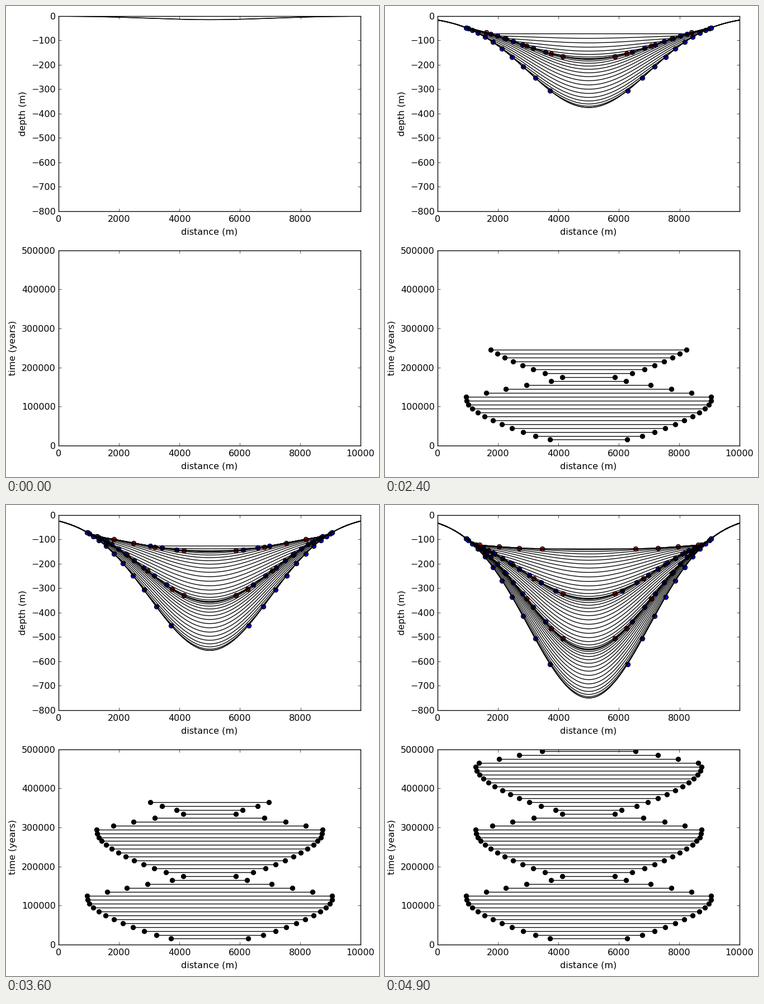
A matplotlib script for the animation above (5000 ms loop, 667 by 840 pixels).

```python
import matplotlib.pyplot as plt
import numpy as np
from matplotlib.animation import FuncAnimation

W, H, DPI = 667, 840, 100
PX = 72 / DPI  # points per pixel
STEPS, STEP_MS, STEP_YEARS = 50, 100, 10000
SUBSIDENCE = 15  # metres per step at the basin centre
CENTRE, SIGMA, DX = 5000, 2000, 10
MEAN_SUPPLY = 2.5 * CENTRE**2 / 2  # sediment volume per radian and step
CYCLES = 3

plt.rcParams.update({
    "font.family": "DejaVu Sans",
    "font.size": 16 * PX,
    "axes.linewidth": 1.33 * PX,
    "lines.linewidth": 1.33 * PX,
    "lines.markersize": 8 * PX,
    "lines.markeredgewidth": 1.33 * PX,
})

x = np.arange(0, 10000, DX)
radius = np.abs(x - CENTRE)


def sag(pos):
    return SUBSIDENCE * np.exp(-((pos - CENTRE) / SIGMA) ** 2 / 2)


def fill_level(surface, volume):
    """Level to which a round basin fills when given this volume."""
    low, high = surface.min(), 0.0
    for _ in range(50):
        mid = (low + high) / 2
        filled = np.sum(np.maximum(mid - surface, 0) * radius) * DX / 2
        low, high = (mid, high) if filled < volume else (low, mid)
    return (low + high) / 2


def build_basin():
    """Surfaces, fill levels and left pinch-outs at the time of deposition."""
    surfaces, levels, edges = [np.zeros(len(x))], [], []
    left = x <= CENTRE
    for step in range(STEPS):
        surface = surfaces[-1] - sag(x)
        supply = MEAN_SUPPLY * (1 - np.cos(2 * np.pi * CYCLES * step / STEPS))
        level = fill_level(surface, supply)
        edges.append(np.interp(-level, -surface[left], x[left]))
        levels.append(level)
        surfaces.append(np.maximum(surface, level))
    return surfaces, levels, edges


surfaces, levels, edges = build_basin()

fig = plt.figure(figsize=(W / DPI, H / DPI), dpi=DPI, facecolor="white")


def add_axes(top, xmax, ylim, yticks, xlabel_y, ylabel, ylabel_x):
    left, width, height = 94.1, 540, 348
    ax = fig.add_axes([left / W, 1 - (top + height) / H, width / W, height / H])
    ax.set(xlim=(0, xmax), ylim=ylim, yticks=yticks,
           xticks=np.arange(0, xmax + 1, 2000))
    ax.ticklabel_format(style="plain", useOffset=False)
    ax.tick_params(direction="in", top=True, right=True,
                   length=5.33 * PX, width=0.67 * PX, pad=5.33 * PX)
    ax.tick_params(axis="x", pad=7 * PX)
    fig.text((left + width / 2) / W, 1 - xlabel_y / H, "distance (m)",
             ha="center", va="center")
    fig.text(ylabel_x / W, 1 - (top + height / 2) / H, ylabel,
             rotation=90, ha="center", va="center")
    return ax


section = add_axes(17.9, x[-1], (-800, 0), np.arange(-800, 1, 100),
                   403, "depth (m)", 31)
chart = add_axes(435.9, 10000, (0, 500000), np.arange(0, 500001, 100000),
                 821, "time (years)", 13)

horizons, pinchouts, spans = [], {}, {}
for step in range(-1, STEPS):
    horizons.append(section.plot([], [], "k-")[0])
    if step < 1:
        continue
    ends = np.array([edges[step], 2 * CENTRE - edges[step]])
    retreating = step > 1 and edges[step] > edges[step - 1] + 20
    # Pinch-out dots lie beneath all horizons.
    pinchouts[step] = section.plot(ends, [0, 0], "o", mec="black", zorder=1,
                                   mfc="red" if retreating else "blue")[0]
    year = (step + 0.5) * STEP_YEARS
    spans[step] = chart.plot(ends, [year, year], "ko-")[0]


def update(now):
    for step, horizon in enumerate(horizons, start=-1):
        horizon.set_visible(step <= now)
        horizon.set_data(x, surfaces[step + 1] - (now - step) * sag(x))
    for step, marker in pinchouts.items():
        marker.set_visible(step <= now)
        spans[step].set_visible(step <= now)
        depth = levels[step] - (now - step) * sag(edges[step])
        marker.set_ydata([depth, depth])
    return []


anim = FuncAnimation(fig, update, frames=STEPS, interval=STEP_MS,
                     repeat=True, repeat_delay=0, blit=False)
plt.show()
```
